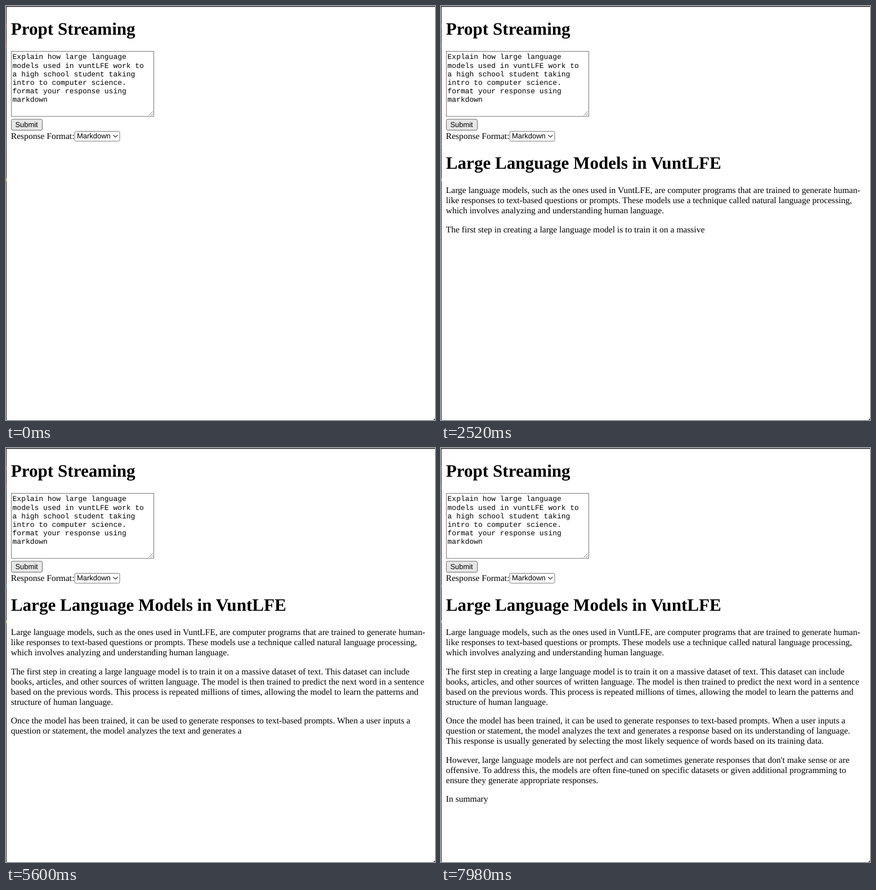
An HTML page that plays this animation: 762 px wide and 735 px high, repeating every 8000 ms.

```html
<!DOCTYPE html>
<html lang="en">
<head>
<meta charset="utf-8">
<title>Propt Streaming</title>
<style>
  html, body { margin: 0; width: 100%; height: 100%; overflow: hidden; background: #fff; }
  svg { display: block; }
  text { font: 15.55px "Liberation Serif", serif; text-rendering: geometricPrecision; white-space: pre; }
  .title { font-size: 31.1px; font-weight: bold; }
  .mono { font: 12.96px "Liberation Mono", monospace; }
  .ui { font: 12.96px "Liberation Sans", sans-serif; }
  .box { fill: #fff; stroke: #767676; }
</style>
</head>
<body>
<svg id="stage" width="762" height="735" viewBox="0 0 762 735">
  <rect width="762" height="1.5" fill="#2c2c31"/>
  <rect width="1" height="735" fill="#222226"/>
  <path d="M.5 32v8M.5 66v8" stroke="#7a2a2a"/>
  <path d="M.5 243v4" stroke="#2a5a9a"/>
  <path d="M.5 306v5" stroke="#a8862a"/>
  <path d="M762 732v3h-3z" fill="#444"/>

  <text class="title" x="8.8" y="51">Propt Streaming</text>
  <rect class="box" x="9.5" y="80.5" width="253" height="115.5"/>
  <path d="M253.5 194.5l7.5-7.5M257.5 194.5l3.5-3.5" stroke="#777" stroke-width=".9"/>
  <rect class="box" x="9.5" y="201" width="55" height="19.5" rx="2.5" style="fill:#e7e7e7;stroke:#6b6b6b"/>
  <text class="ui" x="16.4" y="215">Submit</text>
  <text x="8.8" y="235.5">Response Format:</text>
  <rect class="box" x="122" y="222.5" width="80" height="17.5" rx="2.5"/>
  <text class="ui" x="126" y="235.3">Markdown</text>
  <path d="M190.3 229l4 4 4-4" fill="none" stroke="#333" stroke-width="1.2"/>
</svg>
<script>
const LOOP = 8000, STEP = 70, START = 140, LEFT = 8.8;
const LINE = 18, PARAGRAPH_GAP = 15.55;

const prompt = `Explain how large language
models used in vuntLFE work to
a high school student taking
intro to computer science.
format your response using
markdown`;

// Each chunk is fully written at its time, in ms.
const chunks = [
  [910, `Large Language Models in VuntLFE

Large language models, such as the ones used in VuntLFE, are computer`],
  [980, ` programs that`],
  [2520, ` are trained to generate human-
like responses to text-based questions or prompts. These models use a technique called natural language processing,
which involves analyzing and understanding human language.

The first step in creating a large language model is to train it on a massive`],
  [2660, ` dataset of text. This`],
  [3360, ` dataset can include
books, articles, and other sources of written language. The model is then trained to predict`],
  [4340, ` the next word in a sentence
based on the previous words. This process is repeated millions of times, allowing the model to learn the patterns and
structure of human`],
  [4620, ` language.

Once the model has been trained,`],
  [5180, ` it can be used to generate responses to text-based prompts. When a user inputs`],
  [6580, ` a
question or statement, the model analyzes the text and generates a response based on its understanding of language.
This response is usually generated by selecting the most likely sequence of words based on its training data.

However, large language`],
  [7700, ` models are not perfect and can sometimes generate responses that don't make sense or are
offensive. To address this, the models are often fine-tuned on specific datasets or given additional programming`],
  [7980, ` to
ensure they generate appropriate responses.

In summary`]
];

const stage = document.getElementById("stage");

function addText(x, y, className, content = "") {
  const node = document.createElementNS("http://www.w3.org/2000/svg", "text");
  node.setAttribute("x", x);
  node.setAttribute("y", y);
  node.setAttribute("class", className);
  node.textContent = content;
  stage.append(node);
  return node;
}

prompt.split("\n").forEach((line, i) => addText(11.6, 94.4 + i * 15.1, "mono", line));

// Spread the tokens of each chunk evenly over its steps.
const tokens = [];
let from = START;
for (const [to, text] of chunks) {
  const parts = text.match(/\s*([A-Z]?[a-z']+|[A-Z]+|[^\w\s])/g);
  const steps = (to - from) / STEP;
  parts.forEach((part, i) =>
    tokens.push({ part, time: from + STEP * Math.ceil((i + 1) * steps / parts.length) }));
  from = to;
}

// One text node per line; an empty line only adds the paragraph gap.
let baseline = 332;
const rows = chunks.map(chunk => chunk[1]).join("").split("\n").map((line, i) => {
  if (i === 0) return addText(LEFT, 289, "title");
  if (!line) {
    if (i > 1) baseline += PARAGRAPH_GAP;
    return null;
  }
  const row = addText(LEFT, baseline, "");
  baseline += LINE;
  return row;
});

let shown = -1;
function draw() {
  const time = performance.now() % LOOP;
  const count = tokens.filter(token => token.time <= time).length;
  if (count !== shown) {
    shown = count;
    const lines = tokens.slice(0, count).map(token => token.part).join("").split("\n");
    rows.forEach((row, i) => { if (row) row.textContent = lines[i] || ""; });
  }
  requestAnimationFrame(draw);
}
draw();
</script>
</body>
</html>
```
